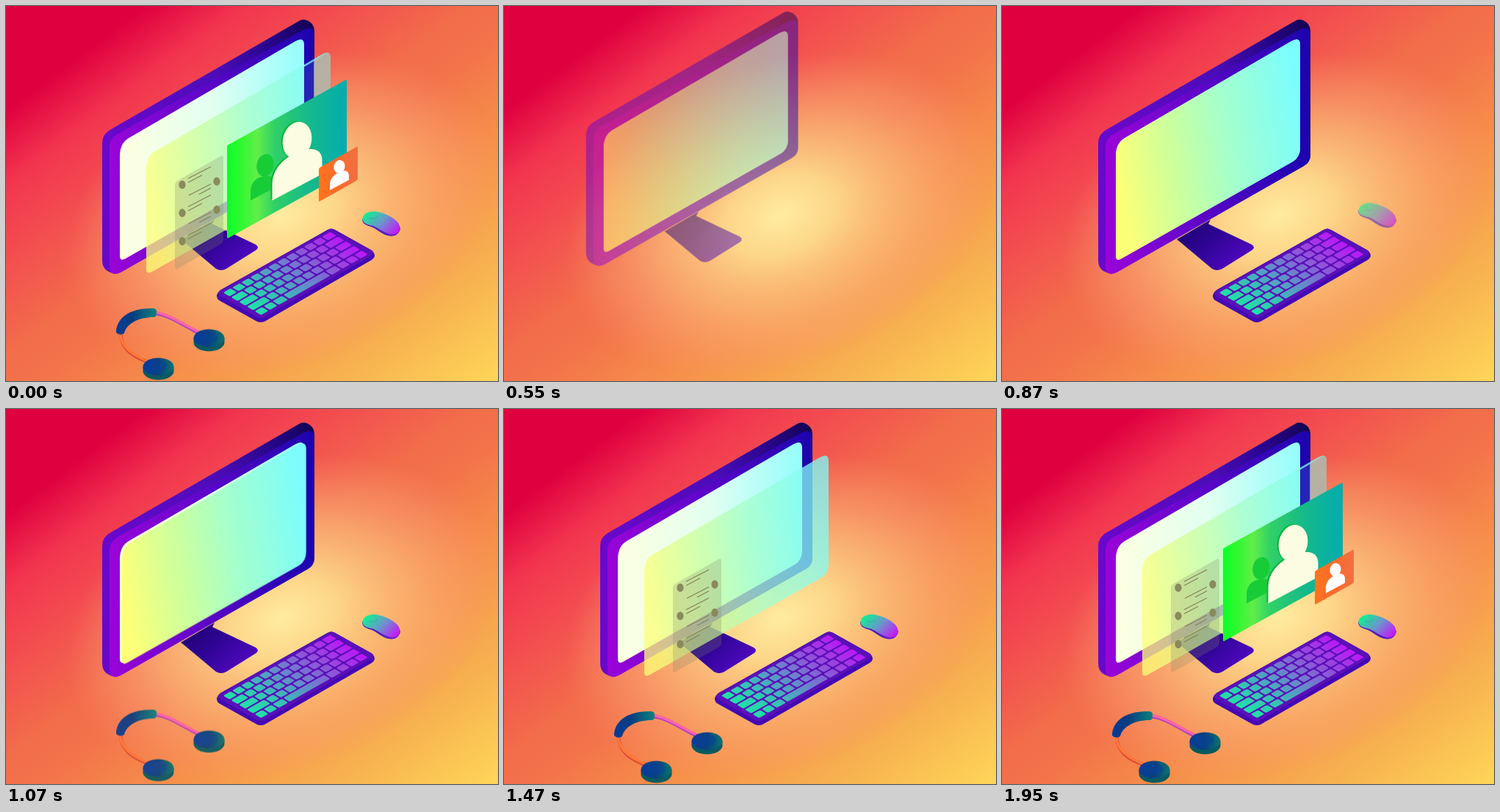
Animation of 670 by 511 pixels, one loop 2.23 s. Source, as an HTML page:

```html
<!DOCTYPE html>
<html lang="en">
<head>
<meta charset="utf-8">
<title>Online meeting desk</title>
<style>
html, body { margin: 0; width: 100%; height: 100%; overflow: hidden; background: #f26d4a; }
svg { display: block; width: 670px; height: 511px; }
.part { animation: 2230ms linear infinite; }
#monitor { animation-name: monitor; }
#keyboard { animation-name: keyboard; }
#mouse { animation-name: mouse; }
#headset { animation-name: headset; }
#glass { animation-name: glass; }
#chat { animation-name: chat; }
#tint { animation-name: tint; }
#call { animation-name: call; }
#self { animation-name: self; }

@keyframes monitor {
  0%, 9.41% { opacity: 1; transform: translate(0, 0); }
  9.417%, 20.63% { opacity: 0; transform: translate(-38px, -21.5px); }
  28.92%, 100% { opacity: 1; transform: translate(0, 0); }
}
@keyframes keyboard {
  0%, 9.41% { opacity: 1; transform: translate(0, 0); }
  9.417%, 27.35% { opacity: 0; transform: translate(0, -30.6px); }
  35.43%, 100% { opacity: 1; transform: translate(0, 0); }
}
@keyframes mouse {
  0%, 9.41% { opacity: 1; transform: translate(0, 0); }
  9.417%, 34.08% { opacity: 0; transform: translate(0, -30px); }
  42.15%, 100% { opacity: 1; transform: translate(0, 0); }
}
@keyframes headset {
  0%, 9.41% { opacity: 1; transform: translate(0, 0); }
  9.417%, 40.58% { opacity: 0; transform: translate(0, -30px); }
  48.65%, 100% { opacity: 1; transform: translate(0, 0); }
}
@keyframes glass {
  0%, 9.41% { opacity: .76; transform: translate(36px, 18px); }
  9.417%, 47.4% { opacity: 1; transform: translate(0, 0); }
  55.6%, 100% { opacity: .76; transform: translate(36px, 18px); }
}
@keyframes chat {
  0%, 9.41% { opacity: 1; transform: translate(0, 0); }
  9.417%, 53.81% { opacity: 0; transform: translate(-36px, -18px); }
  61.88%, 100% { opacity: 1; transform: translate(0, 0); }
}
@keyframes tint {
  0%, 9.41% { opacity: .85; }
  9.417%, 66.82% { opacity: 0; }
  69.96%, 100% { opacity: .85; }
}
@keyframes call {
  0%, 9.41% { opacity: 1; transform: translate(0, 0); }
  9.417%, 65.92% { opacity: 0; transform: translate(-36px, -18px); }
  73.54%, 100% { opacity: 1; transform: translate(0, 0); }
}
@keyframes self {
  0%, 9.41% { opacity: 1; transform: translate(0, 0); }
  9.417%, 76.23% { opacity: 0; transform: translate(-20px, -8px); }
  84.3%, 100% { opacity: 1; transform: translate(0, 0); }
}
</style>
</head>
<body>
<svg viewBox="0 0 670 511" xmlns="http://www.w3.org/2000/svg">
  <defs>
    <linearGradient id="sky" gradientUnits="userSpaceOnUse" x1="0" y1="0" x2="487" y2="649">
      <stop offset=".14" stop-color="#df003f"/>
      <stop offset=".24" stop-color="#f2354f"/>
      <stop offset=".34" stop-color="#f34d50"/>
      <stop offset=".47" stop-color="#f26d4a"/>
      <stop offset=".54" stop-color="#f3744a"/>
      <stop offset=".67" stop-color="#f6904a"/>
      <stop offset=".84" stop-color="#f7b350"/>
      <stop offset="1" stop-color="#ffd658"/>
    </linearGradient>
    <radialGradient id="glow" gradientUnits="userSpaceOnUse" cx="0" cy="0" r="1"
      gradientTransform="translate(376 285) rotate(-21) scale(305 208)">
      <stop offset="0" stop-color="#ffeca0"/>
      <stop offset=".25" stop-color="#fddd8e" stop-opacity=".93"/>
      <stop offset=".58" stop-color="#fbbd7c" stop-opacity=".65"/>
      <stop offset=".82" stop-color="#fba578" stop-opacity=".33"/>
      <stop offset="1" stop-color="#fb9070" stop-opacity="0"/>
    </radialGradient>
    <linearGradient id="shell">
      <stop offset="0" stop-color="#6a08cc"/>
      <stop offset=".55" stop-color="#4a0cb8"/>
      <stop offset=".8" stop-color="#26068a"/>
      <stop offset="1" stop-color="#12044e"/>
    </linearGradient>
    <linearGradient id="bezel">
      <stop offset="0" stop-color="#9a04d8"/>
      <stop offset=".4" stop-color="#6606cc"/>
      <stop offset="1" stop-color="#1a04ae"/>
    </linearGradient>
    <linearGradient id="pale">
      <stop offset="0" stop-color="#fdffe0"/>
      <stop offset=".5" stop-color="#e2fff0"/>
      <stop offset="1" stop-color="#94fdfd"/>
    </linearGradient>
    <linearGradient id="screen" x1="0" y1=".55" x2="1" y2=".35">
      <stop offset="0" stop-color="#fbff78"/>
      <stop offset=".3" stop-color="#ccff9c"/>
      <stop offset=".6" stop-color="#a4ffcc"/>
      <stop offset="1" stop-color="#7cfdfd"/>
    </linearGradient>
    <linearGradient id="foot" x1="0" y1="0" x2="1" y2=".7">
      <stop offset="0" stop-color="#1a0468"/>
      <stop offset=".45" stop-color="#2c0490"/>
      <stop offset="1" stop-color="#5208c4"/>
    </linearGradient>
    <linearGradient id="keyCaps" gradientUnits="userSpaceOnUse" x1="0" y1="0" x2="12.7" y2="0">
      <stop offset="0" stop-color="#1ce6a4"/>
      <stop offset=".22" stop-color="#34c4b4"/>
      <stop offset=".5" stop-color="#6a84cc"/>
      <stop offset=".75" stop-color="#9848dc"/>
      <stop offset="1" stop-color="#c010fa"/>
    </linearGradient>
    <linearGradient id="mouseTop" x1="0" y1=".2" x2="1" y2=".8">
      <stop offset="0" stop-color="#0cf490"/>
      <stop offset=".5" stop-color="#6c94cc"/>
      <stop offset="1" stop-color="#c814fa"/>
    </linearGradient>
    <linearGradient id="band">
      <stop offset="0" stop-color="#0a3c94"/>
      <stop offset=".4" stop-color="#083c80"/>
      <stop offset="1" stop-color="#0a847c"/>
    </linearGradient>
    <linearGradient id="cup">
      <stop offset="0" stop-color="#0a3a9c"/>
      <stop offset=".5" stop-color="#08427c"/>
      <stop offset="1" stop-color="#0a7470"/>
    </linearGradient>
    <linearGradient id="green">
      <stop offset="0" stop-color="#0cff28"/>
      <stop offset=".12" stop-color="#30f830"/>
      <stop offset=".25" stop-color="#60ee48"/>
      <stop offset=".4" stop-color="#30d068"/>
      <stop offset=".7" stop-color="#14b88c"/>
      <stop offset="1" stop-color="#04acb0"/>
    </linearGradient>
    <linearGradient id="orange">
      <stop offset="0" stop-color="#fc741c"/>
      <stop offset=".5" stop-color="#fa6a2c"/>
      <stop offset="1" stop-color="#f07040"/>
    </linearGradient>
    <path id="pane" d="M155 205Q155 187 167 180L394 48Q406 41 406 53V193Q406 206 396 212L163 344Q155 349 155 340Z"/>
    <g id="person">
      <ellipse cx="396.500" cy="183" rx="19.500" ry="25.500" transform="rotate(14 396.500 183)"/>
      <path d="M362.500 265V243C362.500 222 379 206 399 198C417 191 430.500 195 430.500 210V229Z"/>
    </g>
    <g id="earcup">
      <path d="M-21 0V6A21 12 0 0 0 21 6V0Z" fill="#075a60"/>
      <ellipse rx="21" ry="12" fill="url(#cup)"/>
      <ellipse cx="-2" cy="-1" rx="14" ry="8" fill="#0a3f9a" opacity=".55"/>
    </g>
    <g id="message">
      <ellipse cx="240" cy="243.500" rx="4.600" ry="5.800" stroke="none"/>
      <path d="M248 235L279 219M248 240.500L267 230.500"/>
    </g>
    <g id="reply">
      <ellipse cx="287" cy="239" rx="4.600" ry="5.800" stroke="none"/>
      <path d="M249 258L279 242.500M263 256.500L279 248"/>
    </g>
  </defs>

  <rect width="670" height="511" fill="url(#sky)"/>
  <rect width="670" height="511" fill="url(#glow)"/>

  <g id="monitor" class="part">
    <path d="M238 318L284 291L281 297L340 325Q346 329 340 333L300 358Q293 362 286 358L243 322Z" fill="url(#foot)"/>
    <path d="M131 187Q131 174 143 168L398 21Q404 17 410 19.500Q420 24 420 34V203Q420 213 411 218L156 363Q148 367 140 362Q131 358 131 347Z" fill="url(#shell)"/>
    <path d="M141 193Q141 181 151 175L402 34Q419 25 419.500 38V203Q420 213 411 218L156 363Q141 370 141 354Z" fill="url(#bezel)"/>
    <use href="#pane" fill="url(#pale)"/>
    <g id="glass" class="part">
      <use href="#pane" fill="url(#screen)"/>
    </g>
  </g>

  <g id="keyboard" class="part">
    <path d="M292 387L438 305Q443 302 448 305L498 333Q502 336 502 341Q501 344 498 346L352 430Q347 432 342 430L290 401Q287 399 287 394Q288 390 292 387Z" fill="#4408b4"/>
    <path d="M292 388L438 305Q443 302 448 305L498 333Q502 336 498 340L352 424Q347 427 342 424L291 395Q287 391 292 388Z" fill="#5a10b8"/>
    <g id="keys" transform="matrix(12.2 -6.93 9.4 5.57 288 391)" fill="url(#keyCaps)"/>
  </g>

  <g id="mouse" class="part">
    <path d="M485 290C485 298 492 299 499 301.500C508 306 514 313 524 313.500C531 314 537 309 537 302Z" fill="#5420c0"/>
    <path d="M485.500 289C488 281 497 279 506 280.500C522 284 536.500 293 536.500 302C536 309 531 313 523 311C513 308 508 303 500 299.500C492 298 485 296 485.500 289Z" fill="url(#mouseTop)"/>
    <path d="M494 289Q500 292 506 287" fill="none" stroke="#3c9cac" stroke-width=".8"/>
  </g>

  <g id="headset" class="part">
    <g fill="none" stroke-linecap="round">
      <path d="M204 419C222 421 238 433 263 446" stroke="#b044c0" stroke-width="5"/>
      <path d="M204 417.500C222 420 238 432 263 444" stroke="#fc64a8" stroke-width="3.500"/>
      <path d="M156 447C157 467 172 478 196 486" stroke="#d84838" stroke-width="4.500"/>
      <path d="M155.500 447C157 465 172 476 196 485" stroke="#ff7838" stroke-width="3.500"/>
    </g>
    <path d="M150 445C150 427 166 411 201 412Q206 413 205 418Q205 424 201 424C180 424 164 433 161 446Q155 450 150 445Z" fill="url(#band)"/>
    <use href="#earcup" x="276.500" y="452.500"/>
    <use href="#earcup" x="207.500" y="491.500"/>
  </g>

  <g id="chat" class="part">
    <rect width="66" height="120" rx="4" transform="matrix(1 -.57 0 1 230 240)" fill="#80846a" fill-opacity=".25"/>
    <g fill="#8a8a5c" stroke="#84845c" stroke-width="1.300">
      <use href="#message"/>
      <use href="#message" y="38.500"/>
      <use href="#message" y="77"/>
      <use href="#reply"/>
      <use href="#reply" y="38.500"/>
    </g>
  </g>

  <g id="tint" class="part">
    <path d="M406 83L419.500 75V127L406 135Z" fill="#1a08ae"/>
    <path d="M419.500 75L433 66Q442 61 442 70V114L419.500 127Z" fill="#bcaa9c"/>
  </g>

  <g id="call" class="part">
    <rect width="163" height="127" rx="2" transform="matrix(1 -.553 0 1 301 190)" fill="url(#green)"/>
    <g fill="#18cc38">
      <ellipse cx="353" cy="217" rx="11.500" ry="15.500" transform="rotate(12 353 217)"/>
      <path d="M333 265V253C333 240 341 233 352 232C359 231 365 232 367 237V247Z"/>
    </g>
    <use href="#person" x="-2" y="-1" fill="#08b438"/>
    <use href="#person" fill="#fcfce2"/>
  </g>

  <g id="self" class="part">
    <rect width="53" height="46" rx="2" transform="matrix(1 -.565 0 1 426 221)" fill="url(#orange)"/>
    <g fill="#fff">
      <ellipse cx="454" cy="219" rx="7.500" ry="9" transform="rotate(14 454 219)"/>
      <path d="M441 251V244C441 235 447 229 455 226C462 223 467 225 467 231V237Z"/>
    </g>
  </g>
</svg>
<script>
const row = (first, count, last) => [first, ...Array(count).fill(1), last];
const rows = [
  row(1, 10, 1.1),
  row(1.4, 9, 1.7),
  row(1.7, 9, 1.4),
  row(2.1, 8, 2),
  [1, 1, 1.2, 4.7, 1.2, 1, 1, 1]
];
const gap = 0.17;
const caps = rows.flatMap((widths, r) => {
  let x = 0.36;
  return widths.map(w => {
    const cap = `<rect x="${x}" y="${0.36 + r * 1.14}" width="${w - gap}" height=".92" rx=".16"/>`;
    x += w;
    return cap;
  });
});
document.getElementById('keys').innerHTML = caps.join('');
</script>
</body>
</html>
```
